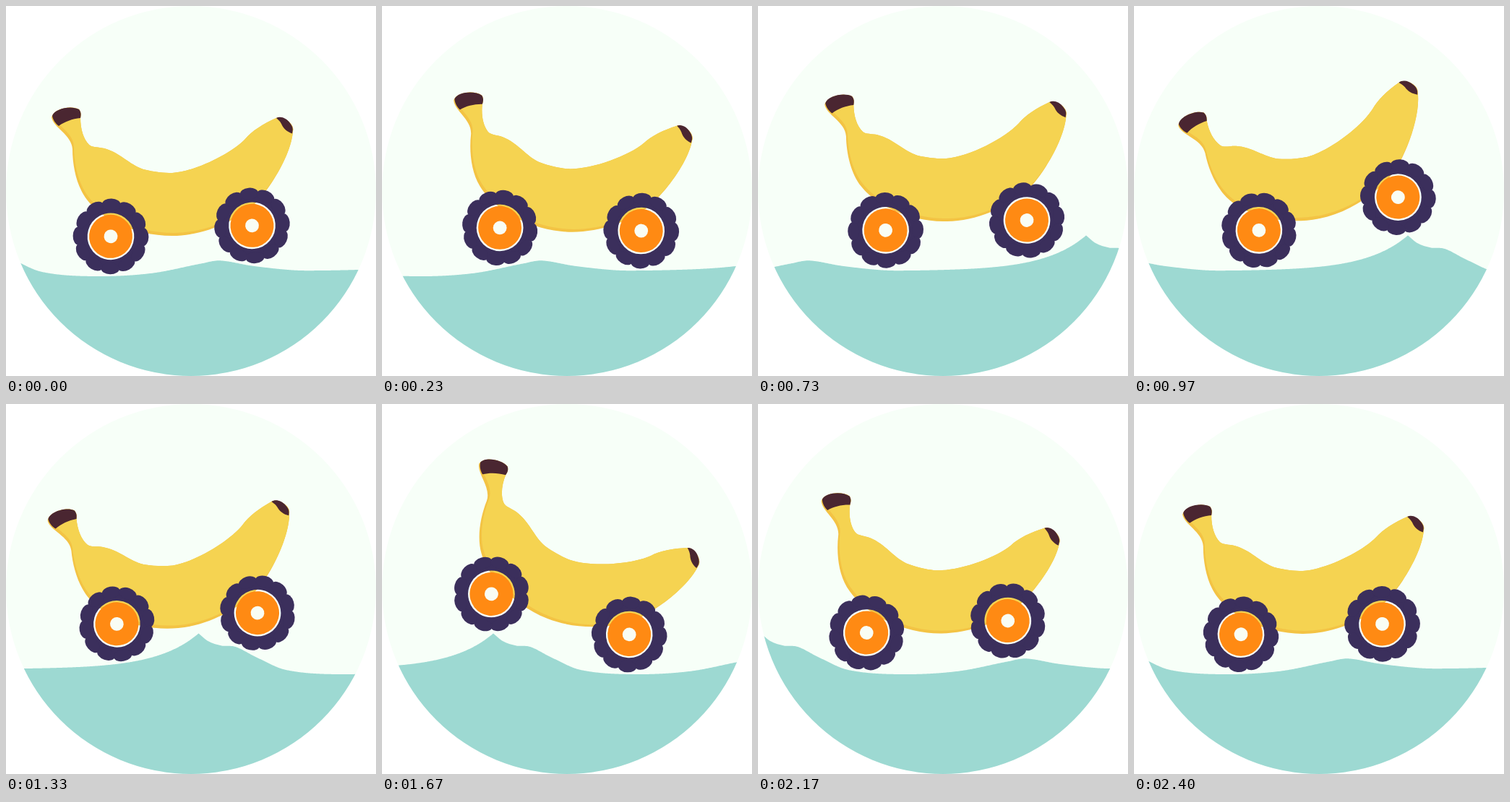
These frames come from a looping animation (512x512 px, 2.43 s). An HTML page:

```html
<!DOCTYPE html>
<html lang="en">
<head>
<meta charset="utf-8">
<title>Banana car</title>
<style>
  html, body { margin: 0; width: 100%; height: 100%; overflow: hidden; background: #fff; }
  svg { display: block; width: 100%; height: 100%; }
</style>
</head>
<body>
<svg viewBox="0 0 512 512">
  <defs>
    <clipPath id="disc"><circle cx="256" cy="256" r="256"/></clipPath>
    <path id="peel" d="M63 154C66 142 90 137 101 143C104 147 104 150 103 155C103 170 107 184 115 192
      C119 196 128 195 136 197C158 203 170 219 190 226C206 230 218 231 230 231C262 229 312 204 331 184
      C340 173 356 163 374 155C384 151 400 164 397 173C396 192 384 220 368 244C362 253 356 261 350 268
      C322 297 274 318 230 318C175 318 130 292 112 268C98 250 92 222 92 198C91 178 65 168 63 154Z"/>
    <clipPath id="inside"><use href="#peel"/></clipPath>
    <g id="wheel">
      <circle r="39.5" fill="none" stroke="#3b2f5c" stroke-width="14.4"/>
      <g id="lobes" fill="#3b2f5c"></g>
      <circle r="30" fill="#ff8a13"/>
      <circle r="9.4" fill="#f9fdf4"/>
    </g>
  </defs>
  <g clip-path="url(#disc)">
    <rect width="512" height="512" fill="#f7fff8"/>
    <path id="ground" fill="#9dd9d2"/>
  </g>
  <g id="body">
    <g transform="translate(-242 -313)">
      <use href="#peel" fill="#f3c344"/>
      <g clip-path="url(#inside)"><use href="#peel" fill="#f5d351" x="2" y="-4"/></g>
      <path fill="#4a2631" d="M64 152C67 142 90 137 101 143C104 147 104 150 103 155
        C92 156 81 160 73 166C69 163 65 158 64 152Z"/>
      <path fill="#4a2631" d="M374 155C380 152 388 155 393 162C398 168 397 172 396 176.5
        C389 174 384 170 381 163C379 159 376 157 374 155Z"/>
    </g>
  </g>
  <use id="rear" href="#wheel"/>
  <use id="front" href="#wheel"/>
</svg>
<script>
const $ = id => document.getElementById(id);
const SPAN = 750, STEP = 12.5, CREST = 679, R = 55, DROOP = 10, LOBES = 12;
const DEG = 180 / Math.PI;

// Smooth curve through [x, y] points, one-sided slopes at both ends
function curve(pts) {
  const last = pts.length - 1;
  const slope = i => {
    const a = pts[Math.max(i - 1, 0)], b = pts[Math.min(i + 1, last)];
    return (b[1] - a[1]) / (b[0] - a[0]);
  };
  return x => {
    let i = 0;
    while (i < last - 1 && x > pts[i + 1][0]) i++;
    const [x0, y0] = pts[i], [x1, y1] = pts[i + 1];
    const h = x1 - x0, s = (x - x0) / h, q = 1 - s;
    return q * q * ((1 + 2 * s) * y0 + s * h * slope(i)) +
           s * s * ((1 + 2 * q) * y1 - q * h * slope(i + 1));
  };
}

// Ground: down from the crest, over a low bump, then an exponential climb to the next crest
const dip = curve([[-71, 317.5], [-58, 328], [-40, 334.3], [-20, 336], [10, 351], [50, 368],
  [120, 374], [200, 370], [270, 356.5], [296, 352.3], [340, 359.5], [400, 365.7], [450, 365.9]]);
const climb = u => 366.8 - 49.3 * Math.exp((u - CREST) / 58);
function ground(x) {
  const u = (x + SPAN - CREST) % SPAN - SPAN + CREST;
  return u < 450 ? dip(u) : climb(u);
}

// Centre height at which a wheel rests on the ground
function rest(u) {
  let y = 512;
  for (let d = 1 - R; d < R; d++) y = Math.min(y, ground(u + d) - Math.sqrt(R * R - d * d));
  return y;
}

// Key poses of the body: tick, x, y, tilt
const poses = [[0, 242, 313, 0], [12, 272.7, 302.6, 9], [24, 268, 286.7, -11.3],
  [33, 250, 304, -5.1], [42, 241.5, 296.6, 21.8], [44.5, 243, 287, 26],
  [49, 247, 309.3, 13.4], [60, 245, 313, 0.4]];
const [bodyX, bodyY, tilt] = [1, 2, 3].map(i => curve(poses.map(p => [p[0], p[i]])));

const place = (id, x, y, a = 0) =>
  $(id).setAttribute("transform", `translate(${x} ${y}) rotate(${a})`);

// A wheel follows the ground but hangs only so far below its axle
function roll(id, k, x, axle) {
  const u = x + STEP * k;
  place(id, x, Math.min(rest(u), axle + DROOP), u / R * DEG);
}

function pose(k) {
  const x = bodyX(k), y = bodyY(k), a = tilt(k);
  const c = Math.cos(a / DEG), s = Math.sin(a / DEG);
  place("ground", -STEP * k, 0);
  place("body", x, y, a);
  roll("rear", k, x - 97 * c, y - 97 * s + 6 * c);
  roll("front", k, x + 98.5 + 0.1 * a, y + 97 * s - 5 * c);
}

$("lobes").innerHTML = Array.from({ length: LOBES }, (_, i) =>
  `<ellipse cy="-44.4" rx="12.8" ry="8" transform="rotate(${i * 360 / LOBES})"/>`).join("");

let d = "M0 512";
for (let x = 0; x <= SPAN + 514; x++) d += `L${x} ${ground(x).toFixed(2)}`;
$("ground").setAttribute("d", d + "V512Z");

// 25 poses a second, shown on a 30 per second clock in whole hundredths
function tick(ms) {
  const n = Math.floor((Math.floor(ms / 10) * 10 + 5) * 0.03);
  return Math.min(60, Math.ceil(n * 5 / 6 - 0.5 - 1e-6));
}

const start = performance.now();
function draw() {
  pose(tick((performance.now() - start) % 2430));
  requestAnimationFrame(draw);
}
draw();
</script>
</body>
</html>
```
